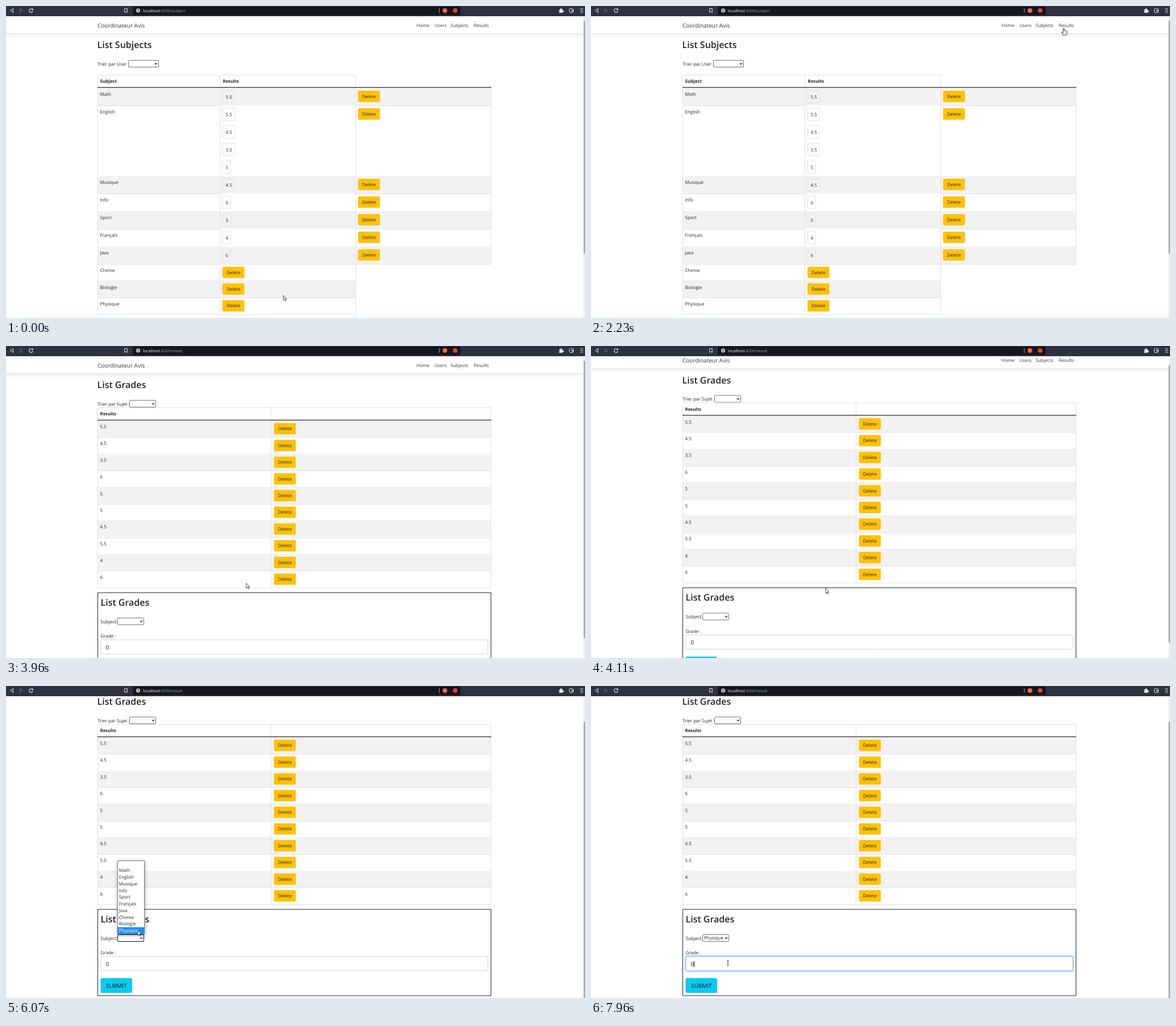
These frames come from a looping animation (1019 px wide and 549 px high, 8000 ms). An HTML page with a canvas:

```html
<!DOCTYPE html>
<html lang="fr">
<head>
<meta charset="utf-8">
<title>List Grades</title>
<style>
html, body { margin: 0; width: 100%; height: 100%; overflow: hidden; background: #fff; }
canvas { display: block; }
</style>
</head>
<body>
<canvas id="stage" width="1019" height="549"></canvas>
<script>
const c = document.getElementById('stage').getContext('2d', { alpha: false });
const LOOP = 8000, INK = '#212529', LINE = '#dee2e6', STRIPE = '#f2f2f2';
const subjects = ['Math', 'English', 'Musique', 'Info', 'Sport', 'Français', 'Java', 'Chimie', 'Biologie', 'Physique'];
const marks = [['5.5'], ['5.5', '4.5', '3.5', '5'], ['4.5'], ['6'], ['5'], ['4'], ['6'], [], [], []];
const grades = ['5.5', '4.5', '3.5', '6', '5', '5', '4.5', '5.5', '4', '6'];

// Pointer legs: first step time, last step time, steps, end x, end y
const start = [488, 509];
const legs = [
  [200, 360, 3, 488, 505], [750, 750, 1, 488, 502], [910, 1690, 11, 763, 147],
  [1750, 2230, 7, 832, 39], [2310, 2460, 3, 836, 35], [3240, 4020, 11, 413, 426.5],
  [4410, 4640, 4, 351.5, 447.5], [4800, 5270, 7, 232, 447], [5830, 6070, 4, 232, 430],
  [6620, 7180, 8, 230, 489], [7330, 7330, 1, 230, 490], [7960, 7960, 1, 241, 487]
];
// Wheel scroll: time, offset
const scrolls = [[0, 0], [4020, 2], [4110, 8.5], [4180, 30], [4260, 41]];

function rect(x, y, w, h, color) {
  c.fillStyle = color;
  c.fillRect(x, y, w, h);
}
const hline = (x1, x2, y, color = LINE) => rect(x1, Math.round(y), x2 - x1, 1, color);
const vline = (x, y1, y2, color = LINE) => rect(x, y1, 1, y2 - y1, color);

function box(x, y, w, h, r, fill, stroke, width = 1) {
  c.beginPath();
  c.roundRect(x, y, w, h, r);
  if (fill) { c.fillStyle = fill; c.fill(); }
  if (stroke) { c.strokeStyle = stroke; c.lineWidth = width; c.stroke(); }
}

function disc(x, y, r, color) {
  c.fillStyle = color;
  c.beginPath();
  c.arc(x, y, r, 0, 7);
  c.fill();
}

function draw(path, x, y, stroke, fill, width = 1) {
  const p = new Path2D(path);
  c.save();
  c.translate(x, y);
  c.lineWidth = width;
  c.lineJoin = 'round';
  if (fill) { c.fillStyle = fill; c.fill(p); }
  if (stroke) { c.strokeStyle = stroke; c.stroke(p); }
  c.restore();
}

// Text placed by the middle of its capitals
function text(s, x, mid, size = 8, color = INK, weight = 400, align = 'left') {
  c.font = `${weight} ${size}px "Open Sans", "Noto Sans", sans-serif`;
  c.textAlign = align;
  c.fillStyle = color;
  c.fillText(s, x, mid + size * 0.357);
}

function deleteButton(x, mid) {
  box(x, mid - 10, 38.5, 20, 2, '#ffc107');
  text('Delete', x + 19.3, mid, 8, INK, 400, 'center');
}

function select(x, y, w, value = '', focus = false) {
  box(x + .5, y + .5, w - 1, 12, 1.5, '#fff', focus ? '#101010' : '#767676');
  text(value, x + 3, y + 6.5);
  draw('M-2 -1L0 1.2L2 -1', x + w - 5, y + 6.5, '#222', null, 1.2);
}

function navbar() {
  const shade = c.createLinearGradient(0, 49, 0, 56);
  shade.addColorStop(0, 'rgba(0,0,0,.06)');
  shade.addColorStop(1, 'rgba(0,0,0,0)');
  rect(0, 49, 1016, 7, shade);
  hline(0, 1016, 48, '#e2e3e5');
  text('Coordinateur Avis', 161, 34, 10, '#33363a');
  [['Home', 722.5], ['Users', 754], ['Subjects', 782.5], ['Results', 823]]
    .forEach(([s, x]) => text(s, x, 33.8, 8, '#33363a'));
}

function subjectPage() {
  text('List Subjects', 160.5, 68.5, 16, INK, 600);
  text('Trier par User :', 161, 102);
  select(215, 95, 54);
  text('Subject', 165.5, 132.5, 8, INK, 700);
  text('Results', 381.5, 132.5, 7.8, INK, 700);
  let y = 144;
  subjects.forEach((name, i) => {
    const list = marks[i], n = list.length;
    const h = n ? 31 * n : 29.4, right = n ? 854 : 615;
    if (i % 2 == 0) rect(161, y, right - 161, h, STRIPE);
    text(name, 165.5, y + 11.3);
    list.forEach((m, k) => {
      const mid = y + 15.5 + 31 * k;
      box(381.5, mid - 11, m.length > 1 ? 20.5 : 14, 22, 0, null, LINE);
      text(m, 386.5, mid + .3);
    });
    deleteButton(n ? 619.5 : 381, y + (n ? 15 : 14.7));
    y += h;
    hline(161, n ? 376 : 615, y);
    if (n) hline(615, 854, y);
  });
  hline(376, 615, 454);
  hline(161, 615, 121);
  vline(161, 121, 543);
  vline(376, 121, 543);
  vline(615, 121, 543);
  vline(853, 144, 454);
  rect(161, 142.7, 693, 1.2, INK);
}

function resultPage(t) {
  text('List Grades', 160.5, 68.5, 16, INK, 600);
  text('Trier par Sujet :', 161, 102);
  select(217, 95, 47);
  text('Results', 165.5, 119.5, 7.8, INK, 700);
  grades.forEach((g, i) => {
    const y = 130.8 + 29.4 * i;
    if (i % 2 == 0) rect(161, y, 693, 29.4, STRIPE);
    hline(161, 854, y + 29.4);
    text(g, 165.5, y + 11.4);
    deleteButton(471.5, y + 14.8);
  });
  hline(161, 854, 108);
  [161, 466, 853].forEach(x => vline(x, 108, 425));
  rect(161, 129.8, 693, 1.2, INK);

  box(161.5, 434, 692, 152, 0, null, '#222');
  text('List Grades', 166.5, 451, 16, INK, 600);
  text('Subject:', 166.5, 484.8);
  select(196, 478, 47, t >= 6540 ? 'Physique' : '', t >= 5420 && t < 7640);
  text('Grade :', 166.5, 510.5);
  const glow = Math.min(1, Math.max(0, Math.floor((t - 7640) / 80 + 1) / 3));
  if (glow) {
    c.globalAlpha = glow;
    box(166, 516, 683, 27, 3.5, null, '#c2dbfe', 3);
    c.globalAlpha = 1;
  }
  box(167, 517, 681, 25, 2.5, '#fff', glow ? '#86b7fe' : '#ced4da');
  text('0', 175.5, 530, 10);
  if (glow) vline(181, 525, 536, INK);
  box(166.5, 555, 55.5, 26, 2.5, '#0dcaf0');
  text('SUBMIT', 194.2, 568.5, 10, '#111', 400, 'center');
}

function dropdown(pointerY) {
  c.save();
  c.shadowColor = 'rgba(0,0,0,.35)';
  c.shadowBlur = 6;
  c.shadowOffsetY = 1;
  box(196.5, 307.5, 47, 129, 0, '#fff', '#777');
  c.restore();
  rect(197, 308, 46, 128, '#fff');
  const top = i => 318.6 + 11.75 * i;
  const hot = pointerY < 437 ? Math.floor((pointerY - top(0)) / 11.75) : -1;
  rect(197, Math.max(308, top(hot)), 46, 11.7, '#1e90ff');
  subjects.forEach((s, i) => text(s, 198.7, top(i) + 5.9, 8, i == hot ? '#fff' : INK));
}

function browserBar(url) {
  rect(0, 0, 1019, 18, '#2f3040');
  box(223, 1, 577, 15, 2, '#15161e');
  const pale = '#e4e5ea';
  draw('M2.5 -3.5L-2.5 0L2.5 3.5Z', 10, 8, pale);
  draw('M-2.5 -3.5L2.5 0L-2.5 3.5Z', 27, 8, '#6b6d7b');
  draw('M2.6 -2A3.3 3.3 0 1 0 3.2 1', 44, 8, pale, null, 1.2);
  draw('M3.8 -4V-.8H.6Z', 44, 8, null, pale);
  draw('M-2.3 -3.5H2.3V3.5L0 1.6L-2.3 3.5Z', 211, 8, pale);
  disc(232.5, 8, 3.7, '#b9bac2');
  rect(232, 5.8, 1, 2.6, '#15161e');
  rect(232, 9.2, 1, 1, '#15161e');
  text('localhost', 241, 8.2, 7.1, '#fff');
  text(':4200/' + url, 241 + c.measureText('localhost').width, 8.2, 7.1, '#9a9ca6');
  vline(762, 4, 12, '#a0a2ac');
  disc(772.5, 8, 4, '#fb6a35');
  disc(790.5, 8, 4, '#d9482f');
  draw('M-3.5 -2H-1.2A1.4 1.4 0 1 1 1.2 -2H2.8V0A1.4 1.4 0 1 1 2.8 2.4V4H-3.5V2A1.3 1.3 0 0 0 -3.5 -.3Z', 977, 8, null, pale);
  box(991.5, 5, 7, 6.5, 1, null, pale);
  rect(995, 7.5, 4, 2, pale);
  [5, 8, 11].forEach(y => rect(1010.5, y - .5, 5, 1, pale));
}

function pointer(x, y, kind) {
  if (kind == 'hand')
    draw('M-1 1Q0 -.6 1 1V4.5Q2 3.8 2.7 4.8Q3.7 4.2 4.3 5.2Q5.8 4.8 5.8 6.3V8.5L4.6 12H-1.2L-4 7.6Q-3.6 6 -1 8Z', x, y, '#111', '#fff', .9);
  else if (kind == 'beam')
    draw('M-1.6 -4H1.6M0 -4V4M-1.6 4H1.6', x, y, '#222', null, .9);
  else
    draw('M0 0V8.6L2 6.9L3.4 10L4.7 9.4L3.3 6.4H6Z', x, y, '#222', '#fff', .8);
}

function pointerAt(t) {
  let [x, y] = start;
  for (const [t0, t1, n, ex, ey] of legs) {
    if (t < t0) break;
    const k = t >= t1 ? n : Math.floor((t - t0) / (t1 - t0) * (n - 1)) + 1;
    const u = k / n, p = u * u * (3 - 2 * u);
    x += (ex - x) * p;
    y += (ey - y) * p;
  }
  return [x, y];
}

function render(t) {
  const onResult = t >= 2860;
  const scroll = scrolls.filter(s => s[0] <= t).pop()[1];
  const [x, y] = pointerAt(t);
  rect(0, 0, 1019, 549, '#fff');
  c.save();
  c.translate(0, -scroll);
  navbar();
  onResult ? resultPage(t) : subjectPage();
  c.restore();

  rect(1016, 18, 3, 531, '#f1f1f1');
  box(1016.7, 26 + scroll * .9, 2.3, onResult ? 488 : 410, 0, '#a3a3a3');
  if (t >= 5420 && t < 6540) dropdown(y);
  if (t >= 2610 && t < 3400) {
    const h = t < 2690 ? 1 : 2;
    box(0, 549 - h, 63, 4, [0, 2, 0, 0], '#24252d');
  }
  browserBar(onResult ? 'result' : 'subject');
  const kind = y < 43 && x > 815 ? 'hand' : onResult && y > 476 ? 'beam' : 'arrow';
  pointer(x, y, kind);
}

c.textRendering = 'geometricPrecision';
const began = performance.now();
function tick() {
  render((performance.now() - began) % LOOP);
  requestAnimationFrame(tick);
}
tick();
</script>
</body>
</html>
```
